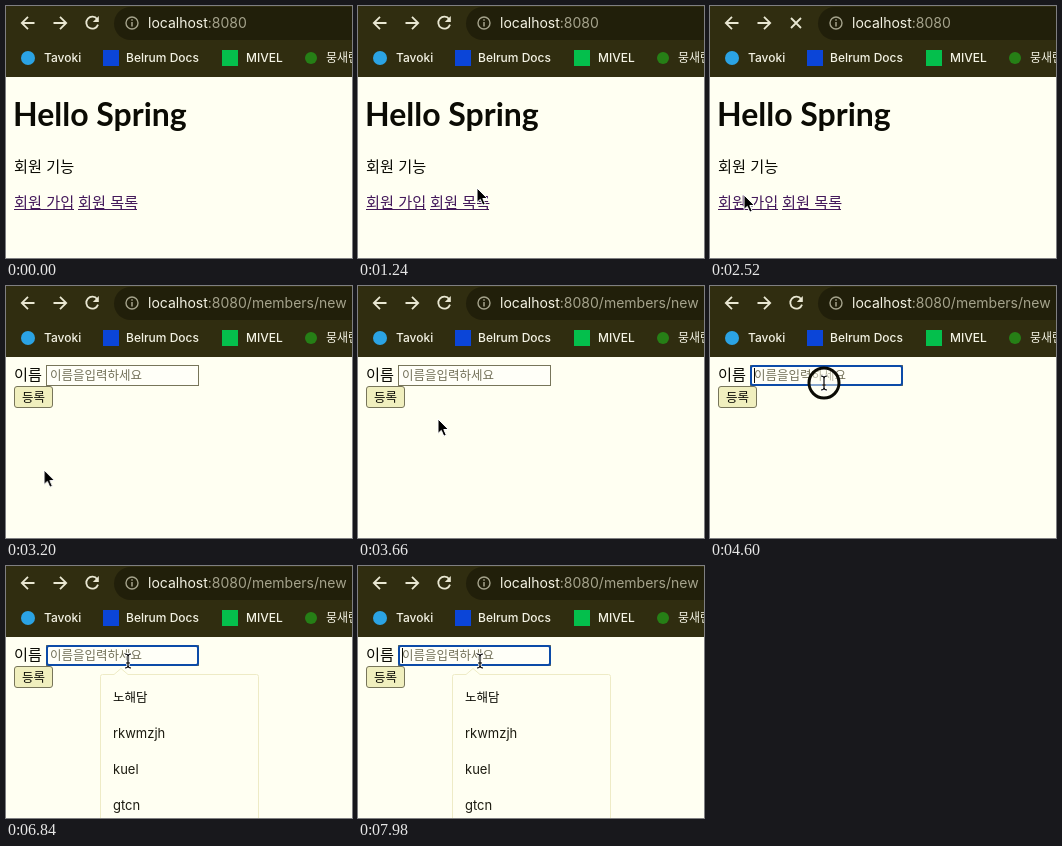
Recreate the animation shown at these times as an HTML page. Size 346x252 px, loop 8 s.

```html
<!DOCTYPE html>
<html lang="ko">
<head>
<meta charset="utf-8">
<title>Hello Spring</title>
<style>
  html, body { margin: 0; width: 100%; height: 100%; overflow: hidden; background: #fffff2; }
  svg { display: block; width: 100%; height: 100%; }
  text { white-space: pre; font-family: Inter, "Noto Sans CJK KR", "Noto Sans CJK", sans-serif; }
  .ko { font-family: "Noto Sans CJK KR", "Noto Sans CJK", sans-serif; font-size: 15.2px; fill: #0b0b04; }
  .small { font-size: 12.5px; }
  .title { font: 700 32px Lato, sans-serif; fill: #0b0b04; }
  .link { fill: #43185a; }
  .url { font-size: 14px; fill: #f4f3e4; }
  .dim { fill: #a5a38c; }
  .mark { font-size: 12px; font-weight: 500; fill: #f4f3e4; }
  .option { font-size: 13px; fill: #1c1b10; }
  .icon { fill: none; stroke: #e9e7d2; stroke-width: 1.8; }
</style>
</head>
<body>
<svg viewBox="0 0 346 252" xmlns="http://www.w3.org/2000/svg">
  <rect width="346" height="252" fill="#fffff2"/>

  <!-- Browser chrome -->
  <rect width="346" height="71" fill="#302d10"/>
  <rect x="108" y="1" width="270" height="33" rx="16.5" fill="#211f0a"/>
  <path class="icon" d="M28.5 17H16M22 10.8L15.8 17L22 23.2"/>
  <path class="icon" d="M47.5 17H60M54 10.8L60.2 17L54 23.2"/>
  <g id="reload">
    <path class="icon" d="M91.2 13.2A6 6 0 1 0 92 18.6"/>
    <path d="M92.8 10V16H86.8Z" fill="#e9e7d2"/>
  </g>
  <path id="stop" class="icon" d="M81 12L91 22M91 12L81 22"/>
  <circle cx="126" cy="17" r="6" fill="none" stroke="#a5a38c" stroke-width="1.4"/>
  <path d="M126 16V20.5M126 13.2V14.8" stroke="#a5a38c" stroke-width="1.5"/>
  <text class="url" x="142" y="22">localhost<tspan class="dim">:8080</tspan><tspan class="dim" id="path">/members/new</tspan></text>

  <circle cx="22" cy="52" r="7" fill="#2ba3e4"/>
  <text class="mark" x="38" y="56">Tavoki</text>
  <rect x="97" y="44" width="16" height="16" fill="#0b45d8"/>
  <text class="mark" x="120" y="56">Belrum Docs</text>
  <rect x="216" y="44" width="16" height="16" fill="#04bf4c"/>
  <text class="mark" x="240" y="56">MIVEL</text>
  <circle cx="305" cy="52" r="6" fill="#267f16"/>
  <text class="mark" x="320" y="56">뭉새란</text>

  <g id="home">
    <text class="title" x="7" y="120">Hello Spring</text>
    <text class="ko" x="8" y="166">회원 기능</text>
    <text class="ko link" x="8" y="201.5">회원 가입</text>
    <text class="ko link" x="72" y="201.5">회원 목록</text>
    <path d="M8 203.5H68M72 203.5H131" stroke="#43185a"/>
  </g>

  <g id="form">
    <text class="ko" x="8" y="94">이름</text>
    <rect x="40.5" y="79.5" width="152" height="20" fill="#fffff8" stroke="#77755a"/>
    <rect id="focus" x="41" y="80" width="151" height="19" rx="2" fill="none" stroke="#0c4ba8" stroke-width="2"/>
    <text class="ko small" x="44" y="94" style="fill:#74725a">이름을입력하세요</text>
    <path id="caret" d="M44.5 82V97" stroke="#0b0b04"/>
    <rect x="8.5" y="100.5" width="38" height="21" rx="2.5" fill="#f0efbe" stroke="#77755a"/>
    <text class="ko small" x="16" y="115.5">등록</text>
  </g>

  <g id="list">
    <path d="M94.5 260V110.5Q94.5 108.5 96.5 108.5H108L115 102.5L122 108.5H250.5Q252.5 108.5 252.5 110.5V260Z" fill="#fffff2" stroke="#eeebc6"/>
    <text class="ko small" x="107" y="136">노해담</text>
    <text class="option" x="107" y="172">rkwmzjh</text>
    <text class="option" x="107" y="208">kuel</text>
    <text class="option" x="107" y="244">gtcn</text>
  </g>

  <g id="pointer">
    <circle id="ring" r="15" fill="#fffff2" fill-opacity=".5" stroke="#0b0b04" stroke-width="3"/>
    <path id="arrow" d="M0 0V14.5L3.3 11.4L5.8 17.2L8.3 16.1L5.8 10.5H10.4Z" fill="#000" stroke="#fff" stroke-linejoin="round"/>
    <g id="beam" fill="none">
      <path d="M-3 -7Q0 -7 0 -4.5Q0 -7 3 -7M0 -5V5M-3 7Q0 7 0 4.5Q0 7 3 7M-2 2H2" stroke="#fff" stroke-width="3"/>
      <path d="M-3 -7Q0 -7 0 -4.5Q0 -7 3 -7M0 -5V5M-3 7Q0 7 0 4.5Q0 7 3 7M-2 2H2" stroke="#000" stroke-width="1.2"/>
    </g>
  </g>
</svg>
<script>
  const LOOP = 8000;
  const PAGE = 2600, HOVER = 4260, FOCUS = 4560, LIST = 5000, BLINK = 840;

  const play = (id, frames) => document.getElementById(id)
    .animate(frames, { duration: LOOP, iterations: Infinity });

  // Shows an element only inside the given [from, to] spans.
  function show(id, ...spans) {
    const frames = [{ offset: 0, opacity: spans[0][0] === 0 ? 1 : 0 }];
    for (const [from, to] of spans) {
      if (from > 0) frames.push({ offset: from / LOOP, opacity: 1 });
      if (to < LOOP) frames.push({ offset: to / LOOP, opacity: 0 });
    }
    frames.push({ offset: 1, opacity: frames.at(-1).opacity });
    play(id, frames.map(f => ({ ...f, easing: 'steps(1, end)' })));
  }

  show('home', [0, PAGE]);
  show('form', [PAGE, LOOP]);
  show('path', [PAGE, LOOP]);
  show('reload', [0, 2500], [2780, LOOP]);
  show('stop', [2500, 2780]);
  show('focus', [FOCUS, LOOP]);
  show('list', [LIST, LOOP]);
  show('arrow', [840, HOVER]);
  show('beam', [HOVER, LOOP]);
  show('ring', [2340, 2490], [FOCUS, 4700]);

  const blinks = [];
  for (let t = FOCUS; t < LOOP; t += BLINK) blinks.push([t, Math.min(t + BLINK / 2, LOOP)]);
  show('caret', ...blinks);

  // Pointer stops: time, x, y
  const stops = [
    [0, 190, 270], [840, 190, 262], [1240, 119, 182], [1660, 112, 184],
    [2300, 34, 189], [3080, 34, 189], [3660, 80, 133], [3900, 82, 131],
    [4440, 114, 97], [4740, 114, 97], [5000, 122, 95], [LOOP, 122, 95]
  ];
  play('pointer', stops.map(([t, x, y]) => ({
    offset: t / LOOP, transform: `translate(${x}px, ${y}px)`, easing: 'ease-in-out'
  })));
</script>
</body>
</html>
```
